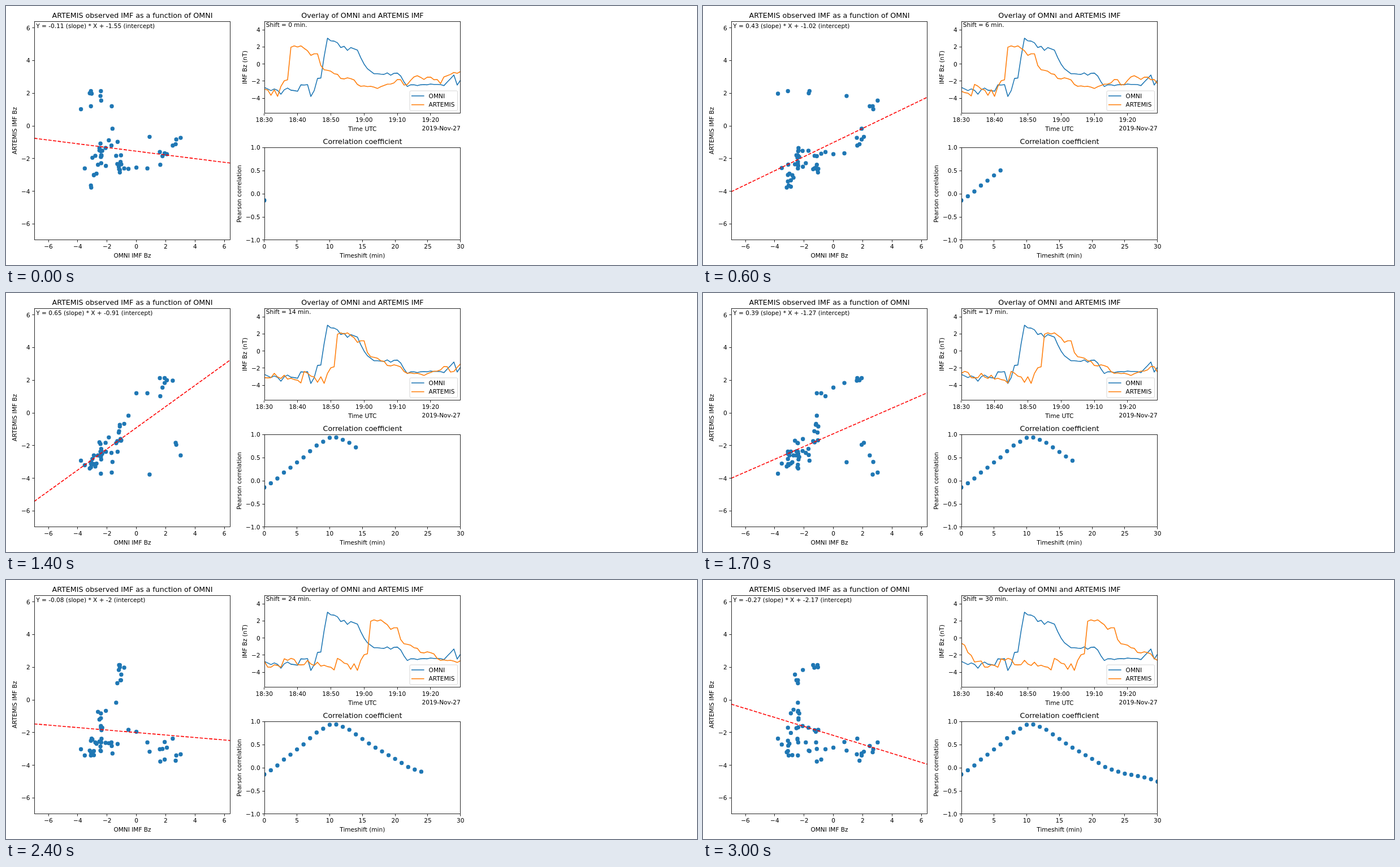
An HTML page for the animation above (3.1 s loop, 1222 by 458 pixels).

```html
<!DOCTYPE html>
<html lang="en">
<head>
<meta charset="utf-8">
<title>Timeshift correlation</title>
<style>
html, body { margin: 0; width: 100%; height: 100%; overflow: hidden; background: #fff; }
svg { display: block; }
text { font: 10.55px "DejaVu Sans", sans-serif; }
.title { font-size: 12.67px; }
.axis { fill: none; stroke: #000; stroke-width: .84; }
.line { fill: none; stroke-width: 1.58; stroke-linejoin: round; }
.dot { fill: none; stroke: #1f77b4; stroke-width: 7.4; stroke-linecap: round; }
</style>
</head>
<body>
<svg id="stage" width="1222" height="458" viewBox="0 0 1222 458"></svg>
<script>
const BLUE = '#1f77b4', ORANGE = '#ff7f0e';
const stage = document.getElementById('stage');

// Bz per minute from 18:30
const omni = [
  -2.72, -2.9, -3.1, -2.9, -3.08, -3.52, -3, -2.8, -3.05, -3.1,
  -3.18, -2.42, -2.45, -2.4, -3.78, -3.1, -1.68, -1.63, .9, 3.02,
  2.72, 2.68, 2.48, 1.93, 2.08, 1.6, 1.93, 1.78, 1.63, .75,
  0, -.54, -.83, -1.13, -1.13, -1.18, -1.2, -1.03, -1.3, -1.08,
  -1.05, -1.38, -2.08, -2.62, -2.42, -2.42, -2.52, -2.42, -2.4, -2.42,
  -2.33, -2.38, -2.38, -2.4, -2.52, -2.1, -1.7, -1.28, -2.45, -1.88];

// Bz per minute from 18:00
const artemis = [
  -.6, -.82, -1.7, -2.02, -2.8, -2.73, -2.68, -3.38, -3.4, -3.13,
  -3.2, -3.4, -2.42, -2.6, -2.37, -2.5, -3.1, -3.13, -3.1, -2.6,
  -3.02, -3.2, -2.82, -3.28, -3.17, -3.33, -3.4, -3.72, -2.37, -2.58,
  -2.92, -3.02, -3.65, -3, -3.77, -2.6, -1.95, -1.83, 1.97, 2.13,
  2, 2.13, 1.83, 1.55, 1.02, 1.2, 1.2, -.17, -.67, -.73,
  -.83, -1.12, -1.2, -1.68, -1.73, -1.6, -1.7, -1.85, -2.38, -2.6,
  -2.55, -2.63, -2.6, -2.7, -2.85, -2.65, -2.5, -2.35, -2.33, -2.2,
  -1.8, -1.83, -2.45, -2.38, -1.9, -1.5, -1.36, -1.55, -1.8, -1.53,
  -1.52, -1.83, -1.8, -2.28, -1.5, -1.35, -1.2, -.98, -1.08, -.88];

function add(tag, attrs, label) {
  const el = document.createElementNS('http://www.w3.org/2000/svg', tag);
  for (const key in attrs) el.setAttribute(key, attrs[key]);
  if (label) el.textContent = label;
  return stage.appendChild(el);
}

const text = (x, y, label, anchor = 'middle', cls = '') =>
  add('text', { x, y, 'text-anchor': anchor, class: cls }, label);

const sideText = (x, y, label) =>
  add('text', { transform: `translate(${x} ${y}) rotate(-90)`, 'text-anchor': 'middle' }, label);

const scale = (origin, unit) => v => origin + v * unit;
const snap = v => Math.floor(v) + .5;
const signed = v => String(v).replace('-', '\u2212');
const polyline = pts => 'M' + pts.map(p => p[0].toFixed(2) + ' ' + p[1].toFixed(2)).join('L');
const dots = pts => pts.map(p => `M${p[0].toFixed(2)} ${p[1].toFixed(2)}h0`).join('');

function panel(id, x, y, w, h, title) {
  const box = { x, y, width: w, height: h };
  add('clipPath', { id }).appendChild(add('rect', box));
  text(x + w / 2, 20.7 + y - 27, title, 'middle', 'title');
  return {
    path: (cls, stroke) => add('path', { class: cls, 'clip-path': `url(#${id})`, ...(stroke && { stroke }) }),
    frame() { add('rect', { ...box, x: snap(x), y: snap(y), width: w - 1, height: h - 1, class: 'axis' }); },
    xTick(px, label) {
      add('path', { d: `M${snap(px)} ${y + h}v3.7`, class: 'axis' });
      text(px, y + h + 15, label);
    },
    yTick(py, label) {
      add('path', { d: `M${x} ${snap(py)}h-3.7`, class: 'axis' });
      text(x - 7.4, py + 3.9, label, 'end');
    }
  };
}

// Scatter panel
const sx = scale(230.6, 25.93), sy = scale(212, -28.9);
const scatter = panel('a', 50, 27, 347, 387, 'ARTEMIS observed IMF as a function of OMNI');
const cloud = scatter.path('dot');
const fit = scatter.path('line', 'red');
fit.setAttribute('stroke-dasharray', '5.86 2.53');
for (let v = -6; v <= 6; v += 2) {
  scatter.xTick(sx(v), signed(v));
  if (v < 6 || sy(v) > 27) scatter.yTick(sy(v), signed(v));
}
scatter.frame();
text(223.5, 444.5, 'OMNI IMF Bz');
sideText(19.3, 220.5, 'ARTEMIS IMF Bz');
const equation = text(53.2, 39, '', 'start');

// Overlay panel
const tx = scale(456.8, 347 / 59), by = scale(102.7, -15.14);
const overlay = panel('b', 457, 27, 347, 163, 'Overlay of OMNI and ARTEMIS IMF');
overlay.path('line', BLUE).setAttribute('d', polyline(omni.map((v, i) => [tx(i), by(v)])));
const shifted = overlay.path('line', ORANGE);
['18:30', '18:40', '18:50', '19:00', '19:10', '19:20'].forEach((s, i) => overlay.xTick(tx(i * 10), s));
for (let v = -4; v <= 4; v += 2) overlay.yTick(by(v), signed(v));
overlay.frame();
text(630.3, 221, 'Time UTC');
text(803.7, 220, '2019-Nov-27', 'end');
sideText(426, 108.5, 'IMF Bz (nT)');
const shiftLabel = text(459.8, 37, '', 'start');
add('rect', { x: 714, y: 150, width: 84.6, height: 35, rx: 2.1, fill: '#fff', stroke: '#ccc', opacity: .8 });
[['OMNI', BLUE], ['ARTEMIS', ORANGE]].forEach(([name, stroke], i) => {
  add('path', { d: `M717.7 ${159 + i * 15.6}h21.1`, class: 'line', 'stroke-linecap': 'square', stroke });
  text(747.6, 162.8 + i * 15.6, name, 'start');
});

// Correlation panel
const mx = scale(456.8, 347 / 30), ry = scale(332.2, -81.7);
const corr = panel('c', 457, 250, 347, 164, 'Correlation coefficient');
const trail = corr.path('dot');
for (let v = 0; v <= 30; v += 5) corr.xTick(mx(v), v + '');
for (let v = -1; v <= 1; v += .5) corr.yTick(ry(v), signed(v.toFixed(1)));
corr.frame();
text(630.3, 444.5, 'Timeshift (min)');
sideText(416, 332.2, 'Pearson correlation');

const mean = a => a.reduce((s, v) => s + v, 0) / a.length;
const cov = (a, b) => mean(a.map((v, i) => v * b[i])) - mean(a) * mean(b);

const steps = Array.from({ length: 31 }, (_, shift) => {
  const data = artemis.slice(30 - shift, 90 - shift);
  const slope = cov(omni, data) / cov(omni, omni);
  return {
    data, slope,
    base: mean(data) - slope * mean(omni),
    r: cov(omni, data) / Math.sqrt(cov(omni, omni) * cov(data, data))
  };
});
const round = v => +v.toFixed(2);

function draw(shift) {
  const { data, slope, base } = steps[shift];
  cloud.setAttribute('d', dots(data.map((v, i) => [sx(omni[i]), sy(v)])));
  fit.setAttribute('d', polyline([-6.97, 6.42].map(x => [sx(x), sy(base + slope * x)])));
  equation.textContent = `Y = ${round(slope)} (slope) * X + ${round(base)} (intercept)`;
  shifted.setAttribute('d', polyline(data.map((v, i) => [tx(i), by(v)])));
  shiftLabel.textContent = `Shift = ${shift} min.`;
  trail.setAttribute('d', dots(steps.slice(0, shift + 1).map((s, i) => [mx(i), ry(s.r)])));
}

const start = performance.now();
function tick(now) {
  draw(Math.floor(Math.max(0, now - start) / 100) % 31);
  requestAnimationFrame(tick);
}
draw(0);
requestAnimationFrame(tick);
</script>
</body>
</html>
```
